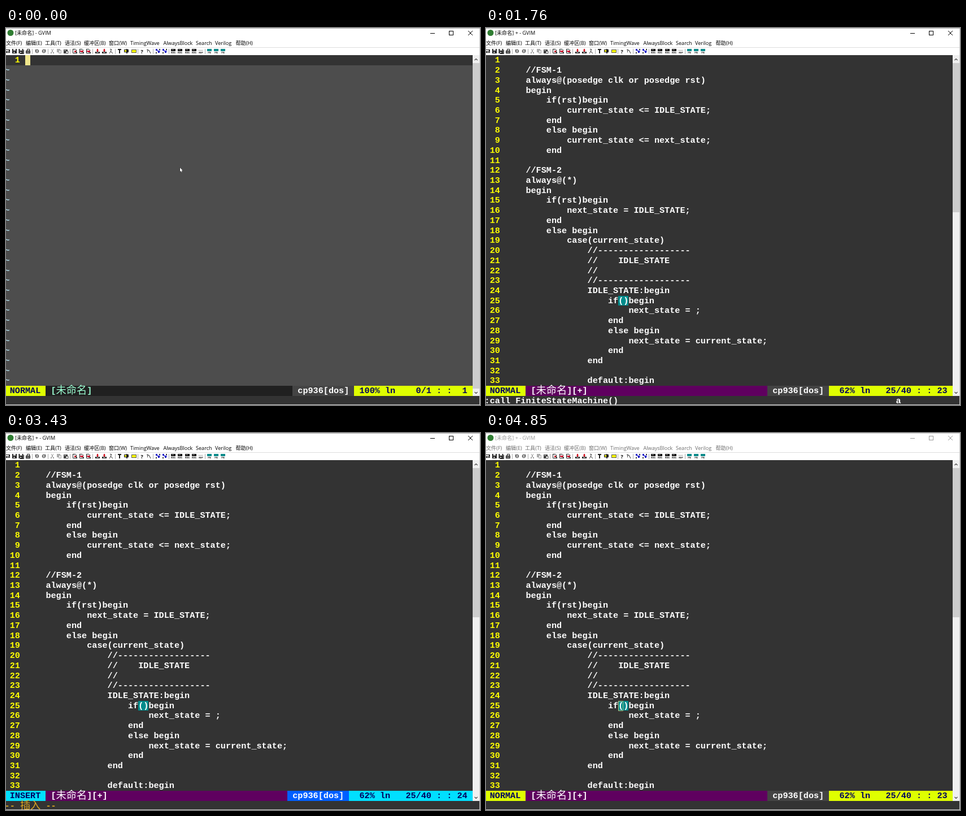
An HTML page with a canvas for the animation above (4.88 s loop, 839 by 667 pixels).

```html
<!DOCTYPE html>
<html lang="zh">
<head>
<meta charset="utf-8">
<title>Editor session</title>
<style>
  html, body { margin: 0; width: 100%; height: 100%; overflow: hidden; background: #333; }
  canvas { display: block; width: 839px; height: 667px; }
</style>
</head>
<body>
<canvas id="stage" width="839" height="667"></canvas>
<script>
const ctx = document.getElementById('stage').getContext('2d');
const LOOP = 4880;

// Character grid of the editor
const CELL_W = 9.1, CELL_H = 17.72, LEFT = -2.4, TOP = 48.4;
const COLS = 91, LINES = 33, STATUS_ROW = 33, COMMAND_ROW = 34;
const PAREN_ROW = 24, PAREN_COL = 26;
const MONO = 'bold 15.167px "Liberation Mono", monospace';
const HAN = '300 18.2px "Noto Sans CJK SC", "Noto Sans CJK", sans-serif';
const UI = '9.1px "Open Sans", "Noto Sans CJK SC", "Noto Sans CJK", sans-serif';
const KHAKI = '#f0e68c', SLATE = '#708090', TEAL = '#008b8b', DARK = '#333';

const CODE = `
    //FSM-1
    always@(posedge clk or posedge rst)
    begin
        if(rst)begin
            current_state <= IDLE_STATE;
        end
        else begin
            current_state <= next_state;
        end

    //FSM-2
    always@(*)
    begin
        if(rst)begin
            next_state = IDLE_STATE;
        end
        else begin
            case(current_state)
                //------------------
                //    IDLE_STATE
                //
                //------------------
                IDLE_STATE:begin
                    if()begin
                        next_state = ;
                    end
                    else begin
                        next_state = current_state;
                    end
                end

                default:begin`.split('\n');

const MENU = [['文件(F)', 0], ['编辑(E)', 35], ['工具(T)', 69], ['语法(S)', 104],
  ['缓冲区(B)', 138], ['窗口(W)', 182], ['TimingWave', 220], ['AlwaysBlock', 278.5],
  ['Search', 336], ['Verilog', 370], ['帮助(H)', 406.5]];

const THEMES = {
  normal: { mode: ['#00005f', '#dfff00'], info: ['#fff', '#444'] },
  insert: { mode: ['#00005f', '#00dfff'], info: ['#fff', '#005fff'] }
};

const colX = col => LEFT + col * CELL_W;
const rowY = row => TOP + row * CELL_H;

function rect(color, x, y, w, h) {
  ctx.fillStyle = color;
  ctx.fillRect(x, y, w, h);
}

function stroke(color, width, ...points) {
  ctx.strokeStyle = color;
  ctx.lineWidth = width;
  ctx.beginPath();
  points.forEach(([x, y]) => ctx.lineTo(x, y));
  ctx.stroke();
}

function label(string, x, y, color = '#000', font = UI) {
  ctx.font = font;
  ctx.fillStyle = color;
  ctx.fillText(string, x, y);
}

function cells(color, col, row, count) {
  const x = Math.round(colX(col)), y = Math.round(rowY(row));
  rect(color, x, y, Math.round(colX(col + count)) - x, Math.round(rowY(row + 1)) - y);
}

// Writes on the grid; Chinese characters take two cells
function write(string, col, row, color) {
  for (const char of string) {
    const wide = char > '\u2e80';
    label(char, colX(col), rowY(row) + (wide ? 14.2 : 13), color, wide ? HAN : MONO);
    col += wide ? 2 : 1;
  }
}

function block(string, col, row, [color, back], count = string.length) {
  cells(back, col, row, count);
  write(string, col, row, color);
}

// Toolbar icons, each about 8 pixels wide around x
const icons = {
  folder(x) { rect('#222', x - 4, 38, 8, 6); rect('#fff', x - 3, 39, 5, 2); rect('#ddd', x - 2, 42, 5, 1); },
  disk(x) { rect('#222', x - 4, 37, 8, 8); rect('#fff', x - 2, 37, 4, 3); rect('#bbb', x - 2, 42, 3, 2); },
  disks(x) { icons.disk(x - .5); stroke('#222', 1, [x + 4.5, 39], [x + 4.5, 45.5], [x - 2, 45.5]); },
  printer(x) { rect('#222', x - 4, 40, 8, 5); rect('#222', x - 2, 37, 5, 3); rect('#fff', x - 1, 38, 3, 2); rect('#fff', x - 3, 42, 6, 1); },
  turn(x, flip = 1) {
    ctx.strokeStyle = '#333'; ctx.lineWidth = 1;
    ctx.beginPath(); ctx.arc(x, 41, 2.8, 0, 7); ctx.stroke();
    stroke('#333', 1, [x - 3 * flip, 38], [x - 2 * flip, 41], [x + 2 * flip, 41]);
  },
  turnBack(x) { icons.turn(x, -1); },
  cut(x) { stroke('#999', 1, [x - 2, 37], [x + 2, 44]); stroke('#999', 1, [x + 2, 37], [x - 2, 44]); rect('#999', x - 3, 43, 2, 2); rect('#999', x + 1, 43, 2, 2); },
  copy(x) { rect('#aaa', x - 4, 37, 6, 6); rect('#aaa', x - 1, 39, 5, 6); rect('#eee', x, 40, 3, 4); },
  paste(x) { rect('#444', x - 4, 38, 7, 7); rect('#ccc', x - 3, 39, 3, 1); rect('#fff', x, 41, 4, 4); stroke('#444', 1, [x, 41], [x + 4, 41], [x + 4, 45], [x, 45], [x, 41]); },
  page(x) { stroke('#222', 1, [x - 3.5, 37.5], [x + 1, 37.5], [x + 2.5, 39], [x + 2.5, 44.5], [x - 3.5, 44.5], [x - 3.5, 37]); rect('#c8102e', x - 1, 40, 3, 3); rect('#222', x + 2, 43, 2, 2); },
  step(x) { icons.page(x); rect('#c8102e', x - 3, 40, 6, 2); },
  tray(x) { rect('#222', x - 4, 42, 8, 3); rect('#fff', x - 2, 43, 4, 1); rect('#d01020', x - 1, 37, 2, 5); rect('#d01020', x - 2, 39, 4, 1); },
  figure(x) { stroke('#222', 1, [x - 2, 37.5], [x + 1, 38], [x - 1, 41], [x + 3, 45]); stroke('#222', 1, [x, 41], [x - 3, 45]); },
  hammer(x) { rect('#222', x - 3, 37, 6, 2); rect('#222', x - 1, 39, 2, 6); },
  build(x) { rect('#222', x - 4, 38, 8, 5); rect('#ee0', x - 3, 39, 4, 3); rect('#222', x, 37, 2, 8); },
  tag(x) { rect('#555', x - 4, 38, 9, 6); rect('#ff0', x - 3, 39, 7, 4); },
  help(x) { label('?', x - 2.5, 44.5, '#000', 'bold 9px "Open Sans", sans-serif'); },
  find(x) { label('?', x - 4, 43, '#000', 'bold 7px "Open Sans", sans-serif'); stroke('#222', 1, [x, 39], [x + 3, 45]); },
  jump(x) { rect('#1818c8', x - 4, 37, 3, 3); rect('#1818c8', x - 2, 40, 6, 1); rect('#1818c8', x, 41, 3, 3); rect('#222', x - 4, 43, 2, 2); rect('#222', x + 2, 37, 2, 2); },
  chip(x) { rect('#111', x - 4, 37, 8, 4); rect('#888', x - 3, 38, 4, 1); caption('REG', x); },
  rule(x) { for (let i = -4; i < 4; i += 2) rect('#555', x + i, 39, 1, 1); caption('REP', x); },
  screen(x) { rect('#078a8a', x - 4, 37, 8, 4); caption('FN', x); }
};

function caption(string, x) {
  ctx.textAlign = 'center';
  label(string, x, 45, '#111', 'bold 4px "Open Sans", sans-serif');
  ctx.textAlign = 'left';
}

const TOOLBAR = `folder disk disks printer | turn turnBack | cut copy paste | page step step |
  tray tray figure | hammer build tag | help find | jump jump |
  chip chip chip chip rule | screen screen screen`.split(/\s+/);

function drawToolbar() {
  let x = 3;
  for (const name of TOOLBAR) {
    if (name === '|') {
      rect('#aaa', Math.round(x - 5), 37, 1, 9);
      x += 3.6;
    } else {
      icons[name](Math.round(x));
      x += 12.03;
    }
  }
}

function drawWindow(modified, active) {
  const ink = active ? '#000' : '#999';
  rect('#fff', 0, 0, 839, 48);
  rect(active ? '#aaa' : '#ccc', 0, 0, 839, 1);
  ctx.fillStyle = '#2f7d32';
  ctx.beginPath(); ctx.arc(8, 8.5, 5.5, 0, 7); ctx.fill();
  label(`[未命名] ${modified ? '+ ' : ''}- GVIM`, 16, 12, ink);
  rect(ink, 751, 9, 8, 1);
  ctx.strokeStyle = ink; ctx.lineWidth = 1;
  ctx.strokeRect(784.5, 5.5, 7, 7);
  stroke(ink, 1, [818, 5], [826, 13]);
  stroke(ink, 1, [826, 5], [818, 13]);
  MENU.forEach(([name, x]) => label(name, x, 30, active ? '#000' : '#6d6d6d'));
  rect('#ddd', 0, 34, 839, 1);
  drawToolbar();

  rect('#f0f0f0', 826, 48, 13, 603);
  rect('#cdcdcd', 826, 62, 12, modified ? 264 : 576);
  stroke('#444', 1.2, [829.5, 57], [832, 54.5], [834.5, 57]);
  stroke('#444', 1.2, [829.5, 644], [832, 646.5], [834.5, 644]);
  rect('#ccc', 838, 1, 1, 666);
  rect('#ccc', 0, 666, 839, 1);
}

function drawBuffer(modified) {
  rect(DARK, 0, 48, 826, 603);
  if (!modified) rect('#4d4d4d', 0, 66, 826, 567);
  for (let row = 0; row < LINES; row++) {
    if (modified || row === 0) {
      write(String(row + 1).padStart(3), 0, row, '#ff0');
      if (modified) write(CODE[row], 4, row, '#fff');
    } else write('~', 0, row, '#add8e6');
  }
}

function drawStatus(mode, modified, column) {
  const theme = THEMES[mode];
  const position = modified ? `  62% ln   25/40 : : ${column} ` : ' 100% ln    0/1 : :  1 ';
  const positionCol = COLS - position.length, infoCol = positionCol - 12;
  block(` ${mode.toUpperCase()} `, 0, STATUS_ROW, theme.mode);
  block(modified ? ' [未命名][+]' : ' [未命名]', 8, STATUS_ROW,
    modified ? ['#fff', '#5f005f'] : ['#9cffd3', '#202020'], infoCol - 8);
  block(' cp936[dos] ', infoCol, STATUS_ROW, theme.info);
  block(position, positionCol, STATUS_ROW, theme.mode);
}

function drawCommand(t) {
  rect(DARK, 0, 651, 838, 15);
  if (t >= 90 && t < 1050) write(t < 620 ? 'f' : 'fs', 80, COMMAND_ROW, '#fff');
  if (t >= 1050 && t < 2040) write(':call FiniteStateMachine()', 0, COMMAND_ROW, '#fff');
  if (t >= 1080 && t < 2040) write('a', 80, COMMAND_ROW, '#fff');
  if (t >= 2040 && t < 3940) write('-- 插入 --', 0, COMMAND_ROW, '#daa520');
  if (t >= 3940 && t < 3970) rect(KHAKI, 0, 652, 6, 14);
}

function drawCursor(t) {
  if (t < 1050) cells(KHAKI, 4, 0, 1);
  if (t < 1080) return;
  block('()', PAREN_COL, PAREN_ROW, ['#fff', TEAL]);
  const solid = t < 1760 || (t >= 3970 && t < 4610);
  const bar = (t >= 2100 && t < 2810) || (t >= 3030 && t < 3430) || (t >= 3670 && t < 3940);
  if (solid) block('(', PAREN_COL, PAREN_ROW, [SLATE, KHAKI]);
  if (bar) rect(KHAKI, 243, 474, 2.5, 18);
  if (t >= 4850) {
    ctx.strokeStyle = KHAKI; ctx.lineWidth = 0.7;
    ctx.strokeRect(234.5, 474.5, 8, 17);
  }
}

function drawArrow(x, y) {
  ctx.beginPath();
  [[0, 0], [0, 7.2], [1.6, 5.8], [2.6, 8.2], [3.8, 7.7], [2.8, 5.4], [5, 5.2]]
    .forEach(([dx, dy]) => ctx.lineTo(x + dx, y + dy));
  ctx.closePath();
  ctx.strokeStyle = '#111'; ctx.lineWidth = 1; ctx.stroke();
  ctx.fillStyle = '#fff'; ctx.fill();
}

function drawPointer(t) {
  if (t >= 3460 && t < 3940) {
    rect('#ccc', 306.5, 240, 1, 15);
    rect('#ccc', 305, 239, 4, 1);
    rect('#ccc', 305, 255, 4, 1);
  } else if (t < 90 || (t >= 3940 && t < 4340)) {
    const p = t < 90 ? 0 : Math.max(0, (t - 3970) / 370);
    const eased = p * p * (3 - 2 * p);
    drawArrow(308 + 250 * eased, 247 + 421 * eased);
  }
}

function draw(t) {
  const modified = t >= 1080;
  const inserting = t >= 2070 && t < 3970;
  drawBuffer(modified);
  drawCursor(t);
  drawStatus(inserting ? 'insert' : 'normal', modified, inserting ? 24 : 23);
  drawCommand(t);
  drawWindow(modified, t < 4850);
  drawPointer(t);
}

const start = performance.now();
function tick() {
  draw((performance.now() - start) % LOOP);
  requestAnimationFrame(tick);
}
tick();
</script>
</body>
</html>
```
